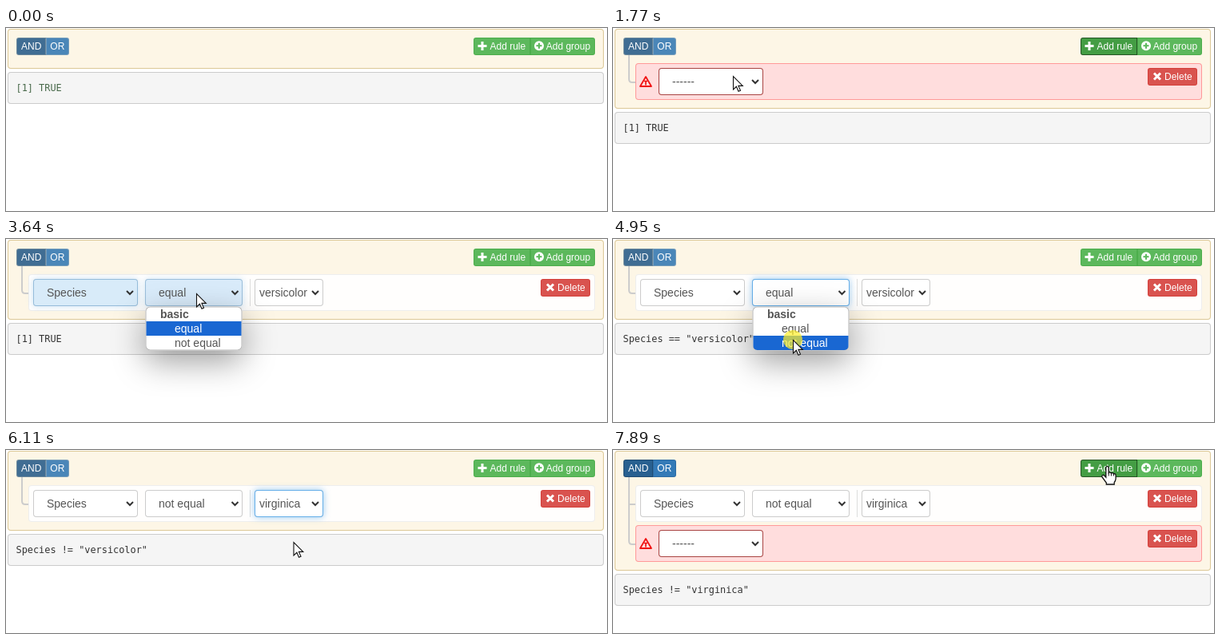
An HTML page with a canvas for the animation above (7.99 s loop, 752 by 229 pixels).

```html
<!DOCTYPE html>
<html lang="en">
<head>
<meta charset="utf-8">
<title>Query builder</title>
<style>
  html, body { margin: 0; width: 100%; height: 100%; overflow: hidden; background: #fff; }
  canvas { display: block; width: 752px; height: 229px; }
</style>
</head>
<body>
<canvas id="stage"></canvas>
<script>
const W = 752, H = 229, LOOP = 7990, STEP = 76.5;
const canvas = document.getElementById('stage');
const ctx = canvas.getContext('2d');
const dpr = window.devicePixelRatio || 1;
canvas.width = Math.round(W * dpr);
canvas.height = Math.round(H * dpr);

const SANS = '"Liberation Sans", Arial, sans-serif';
const MONO = '11.88px "DejaVu Sans Mono", monospace';

const MOVES = [
  [70, 10, 602, 25], [1540, 4, 150, 60], [1850, 2, 76, 64],
  [2490, 3, 116, 109], [3180, 5, 238, 68], [3730, 3, 230, 107],
  [3960, 3, 225, 126], [5030, 5, 360, 68], [5490, 4, 361, 118],
  [5800, 1, 359.5, 115], [6660, 6, 618, 20]
];
const CLICKS = [1160, 2090, 3100, 3490, 4950, 5410, 5950, 7830];
const ADDED = 1240, CHOSEN = 3180, NOT_EQUAL = 5030, VIRGINICA = 6030, SECOND = 7890;

const clamp = v => Math.max(0, Math.min(1, v));
const within = (t, a, b) => t >= a && t < b;

function pointerAt(t) {
  let x = 716, y = 232;
  for (const [start, n, tx, ty] of MOVES) {
    if (t < start) break;
    const k = Math.min(n, Math.floor((t - start) / STEP + 0.2) + 1);
    const u = k / n, e = u * u * (3 - 2 * u);
    x += (tx - x) * e;
    y += (ty - y) * e;
  }
  return { x, y };
}

function focusAt(t, from, to) {
  if (t >= 7830) return 0;
  return clamp((t - from) / 150) * (1 - clamp((t - to) / 150));
}

function shadow(color, blur, dy = 0) {
  ctx.shadowColor = color;
  ctx.shadowBlur = blur * dpr;
  ctx.shadowOffsetY = dy * dpr;
}

function box(x, y, w, h, r, fill, border) {
  ctx.beginPath();
  ctx.roundRect(x, y, w, h, r);
  ctx.fillStyle = border || fill;
  ctx.fill();
  if (!border) return;
  const inner = [].concat(r).map(v => Math.max(0, v - 1));
  ctx.beginPath();
  ctx.roundRect(x + 1, y + 1, w - 2, h - 2, inner);
  ctx.fillStyle = fill;
  ctx.fill();
}

function text(str, x, y, color, size = 14, weight = '') {
  ctx.font = `${weight} ${size}px ${SANS}`;
  ctx.fillStyle = color;
  ctx.fillText(str, x, y);
}

function line(points, color, width) {
  ctx.beginPath();
  points.forEach(([x, y], i) => i ? ctx.lineTo(x, y) : ctx.moveTo(x, y));
  ctx.strokeStyle = color;
  ctx.lineWidth = width;
  ctx.stroke();
}

function plus(x, y, r, color, width) {
  line([[x - r, y], [x + r, y]], color, width);
  line([[x, y - r], [x, y + r]], color, width);
}

function disc(x, y, r, color) {
  ctx.beginPath();
  ctx.arc(x, y, r, 0, Math.PI * 2);
  ctx.fillStyle = color;
  ctx.fill();
}

function conditions(active) {
  ctx.globalAlpha = active ? 1 : 0.65;
  box(13, 12, 37, 22, [3, 0, 0, 3], '#286090', '#204d74');
  box(50, 12, 29, 22, [0, 3, 3, 0], '#337ab7', '#2e6da4');
  ctx.globalAlpha = 1;
  text('AND', 19, 27, '#fff', 12);
  text('OR', 55.3, 27, '#fff', 12);
}

function addButtons(hover, focus) {
  const fill = hover || focus ? '#449d44' : '#5cb85c';
  const edge = focus ? '#255625' : hover ? '#398439' : '#4cae4c';
  box(656, 12, 81, 22, [0, 3, 3, 0], '#5cb85c', '#4cae4c');
  box(585, 12, 71, 22, [3, 0, 0, 3], fill, edge);
  plus(596, 22.5, 5.5, '#fff', 3);
  text('Add rule', 605.5, 27, '#fff', 12);
  disc(667, 22.2, 6, '#fff');
  plus(667, 22.2, 3.5, '#5cb85c', 2);
  text('Add group', 675.7, 27, '#fff', 12);
}

function deleteButton(y) {
  box(669, y, 62, 22, 3, '#d9534f', '#d43f3a');
  line([[677, y + 6.5], [685, y + 14.5]], '#fff', 3);
  line([[685, y + 6.5], [677, y + 14.5]], '#fff', 3);
  text('Delete', 690, y + 15, '#fff', 12);
}

function branch(y, last) {
  ctx.beginPath();
  ctx.moveTo(20, 34);
  if (last) {
    ctx.lineTo(20, y - 4);
    ctx.quadraticCurveTo(20, y, 24, y);
  } else {
    ctx.lineTo(20, y);
  }
  ctx.lineTo(28, y);
  ctx.strokeStyle = '#ccc';
  ctx.lineWidth = 2;
  ctx.stroke();
}

function select(x, y, w, label, pad, focus, error) {
  const glow = error ? '#843534' : '#66afe9';
  if (focus > 0) {
    ctx.save();
    ctx.globalAlpha = focus * 0.7;
    shadow(glow, 8);
    box(x, y, w, 34, 4, '#fff');
    ctx.restore();
  }
  box(x, y, w, 34, 4, '#fff', error ? '#a94442' : '#ccc');
  if (focus > 0) {
    ctx.globalAlpha = focus;
    box(x, y, w, 34, 4, '#fff', glow);
    ctx.globalAlpha = 1;
  }
  text(label, x + pad, y + 22, '#555');
  const cx = x + w - (w < 100 ? 10 : w > 125 ? 10 : 9.5);
  line([[cx - 4, y + 15], [cx, y + 19], [cx + 4, y + 15]], '#333', 2);
}

function warning(y) {
  ctx.lineJoin = 'round';
  ctx.beginPath();
  ctx.moveTo(41, y - 6);
  ctx.lineTo(48, y + 6);
  ctx.lineTo(34, y + 6);
  ctx.closePath();
  ctx.strokeStyle = '#f01414';
  ctx.lineWidth = 1.8;
  ctx.stroke();
  ctx.lineJoin = 'miter';
  line([[39, y - 0.5], [43, y - 0.5]], '#f01414', 1.5);
  line([[41, y - 1], [41, y + 4.5]], '#f01414', 1.7);
}

function emptyRule(y, focus) {
  box(28, y, 709, 46, 4, '#fdd', '#f99');
  warning(y + 23);
  select(57, y + 6, 131, '------', 17, focus, true);
  deleteButton(y + 6);
}

function speciesRule(t) {
  box(28, 44, 709, 46, 4, '#fffefd', '#eee');
  select(34, 50, 131, 'Species', 17, focusAt(t, CHOSEN - 150, 3570), false);
  select(174, 50, 122, t < NOT_EQUAL ? 'equal' : 'not equal', 17, focusAt(t, 3570, 5490), false);
  box(305, 50, 1, 34, 0, '#ddd');
  select(311, 50, 86, t < VIRGINICA ? 'versicolor' : 'virginica', 6, focusAt(t, 5490, 9000), false);
  deleteButton(50);
}

function dropdown(x, w, items, hot, group) {
  ctx.save();
  shadow('rgba(0,0,0,.38)', 40, 14);
  box(x, 84.5, w, 55, 6, '#fff');
  ctx.restore();
  box(x, 84.5, w, 55, 6, '#fff', '#b4b4b4');
  items.forEach((item, i) => {
    const top = 85 + i * 18, head = group && i === 0;
    if (i === hot) {
      box(x + 1, top, w - 2, 18, i === 2 ? [0, 0, 5, 5] : i ? 0 : [5, 5, 0, 0], '#1967d2');
    }
    const pad = w < 100 ? 6 : !group ? 16.5 : head ? 18.5 : 36.5;
    text(item, x + pad, top + 13.5, i === hot ? '#fff' : '#555', 14, head ? 'bold' : '');
  });
}

function menus(t, p) {
  const over = p.y >= 85 ? Math.min(2, Math.floor((p.y - 85) / 18)) : -1;
  if (within(t, 2170, CHOSEN)) {
    dropdown(57.5, 130, ['------', 'Species', 'Sepal.Length'], Math.max(0, over));
  } else if (within(t, 3570, NOT_EQUAL)) {
    dropdown(174.5, 121, ['basic', 'equal', 'not equal'], Math.max(1, over), true);
  } else if (within(t, 5490, VIRGINICA)) {
    dropdown(311.5, 85, ['versicolor', 'virginica', 'setosa'], Math.max(0, over));
  }
}

function output(t, y) {
  box(2, y, 746, 40, 4, '#f5f5f5', '#ccc');
  const str = t < 3800 ? '[1] TRUE'
    : t < 5270 ? 'Species == "versicolor"'
    : t < 6660 ? 'Species != "versicolor"' : 'Species != "virginica"';
  ctx.font = MONO;
  ctx.fillStyle = t < ADDED ? '#48694a' : '#333';
  ctx.fillText(str, 12.5, y + 24);
}

const ARROW = new Path2D('M0 0V16.5L3.9 12.8L6.5 18.8L9 17.7L6.4 11.9H11.8Z');
const HAND = new Path2D('M-1.7 1.2Q0 -1.6 1.7 1.2V8Q3.8 6.4 4.9 8.6Q7 7.3 7.9 9.4Q10.6 8.6 10.6 11.6V15.5Q10.4 18 8.7 20V22.5H-1.2V20.5L-6.6 13.2Q-7 10.3 -4.4 10.9L-1.7 13.6Z');

function pointer(p, hand) {
  ctx.save();
  ctx.translate(p.x + 0.5, p.y + 0.5);
  const shape = hand ? HAND : ARROW;
  ctx.fillStyle = '#fff';
  ctx.fill(shape);
  ctx.strokeStyle = '#111';
  ctx.lineWidth = hand ? 1.3 : 1.1;
  ctx.stroke(shape);
  if (hand) {
    for (const x of [1.7, 4.9, 7.9]) line([[x, 8.5], [x, 12]], '#111', 1);
  }
  ctx.restore();
}

function draw(t) {
  ctx.setTransform(dpr, 0, 0, dpr, 0, 0);
  ctx.fillStyle = '#fff';
  ctx.fillRect(0, 0, W, H);

  const rules = t < ADDED ? 0 : t < SECOND ? 1 : 2;
  const p = pointerAt(t);
  const onButton = p.x >= 585 && p.x < 656 && p.y >= 12 && p.y < 34;
  const bottom = 51 + rules * 50;

  box(2, 1, 746, bottom - 1, 4, '#fdf6e6', '#dcc896');
  for (let i = 0; i < rules; i++) branch(68 + i * 50, i === rules - 1);
  conditions(rules > 1);
  addButtons(onButton, within(t, 1160, 2090) || t >= 7830);
  output(t, bottom + 4);

  if (rules) {
    if (t < CHOSEN) emptyRule(44, focusAt(t, 2090, 9000));
    else speciesRule(t);
  }
  if (rules > 1) emptyRule(94, 0);

  menus(t, p);
  if (CLICKS.some(c => within(t, c, c + (c === 7830 ? 60 : 80)))) {
    disc(p.x, p.y, 12, 'rgba(255,240,40,.7)');
  }
  if (t >= 70) pointer(p, onButton);
}

function tick() {
  draw(performance.now() % LOOP);
  requestAnimationFrame(tick);
}
tick();
</script>
</body>
</html>
```
